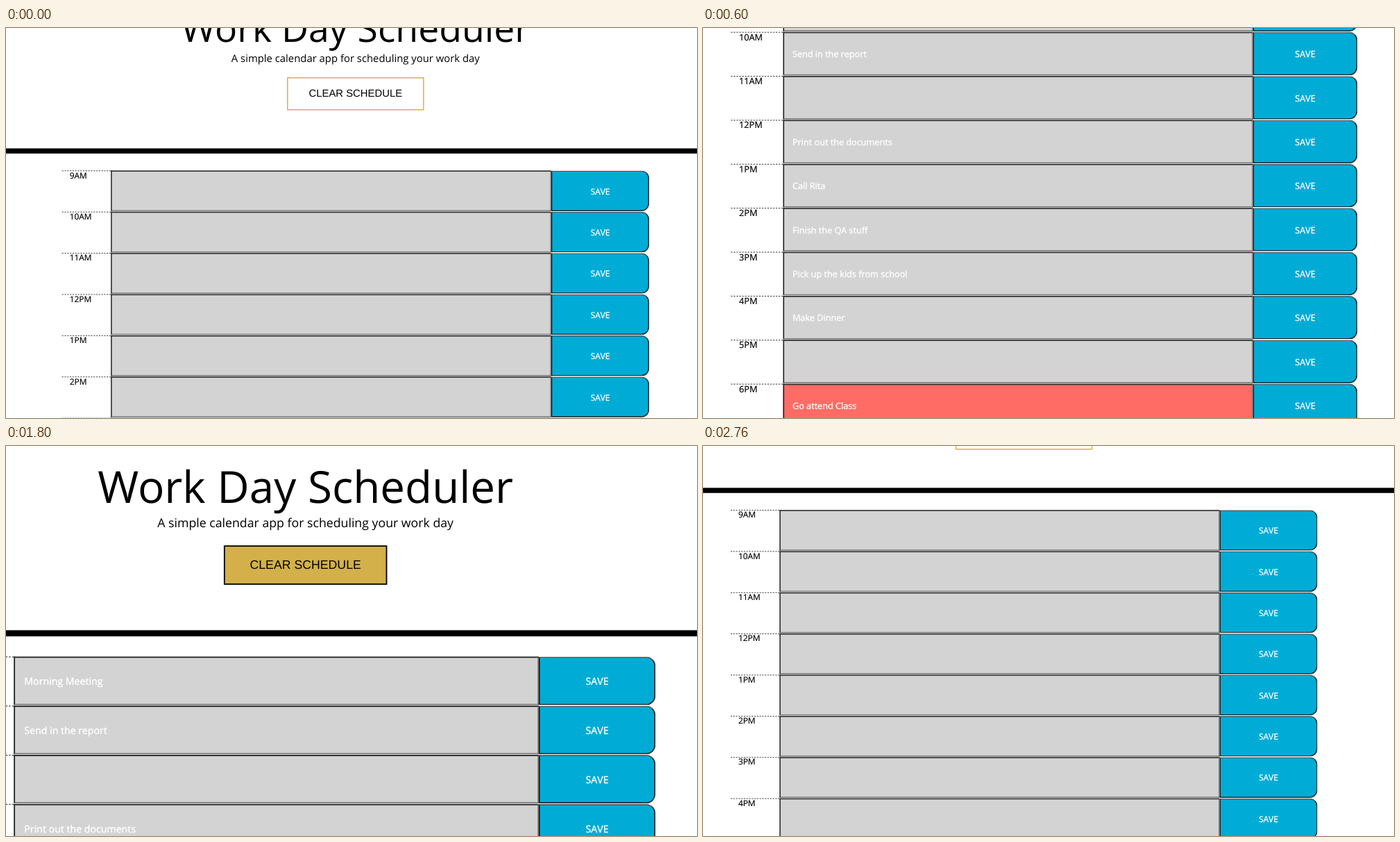
Recreate the animation shown at these times as an HTML page. Size 996 by 562 pixels, loop 3 s.

```html
<!DOCTYPE html>
<html lang="en">
<head>
<meta charset="utf-8">
<title>Work Day Scheduler</title>
<style>
  html, body {
    margin: 0;
    width: 100%;
    height: 100%;
    overflow: hidden;
    background: #fff;
  }
  .stage {
    position: relative;
    width: 100%;
    height: 100%;
    overflow: clip;
    contain: strict;
  }

  /* Camera: origin is the top left corner of the first row. */
  .page {
    position: absolute;
    left: 0;
    top: 0;
    width: 1140px;
    transform-origin: 0 0;
    transform: translate(var(--x), var(--y)) scale(var(--s));
    font: 16px/24px "Open Sans", sans-serif;
    text-rendering: geometricPrecision;
    white-space: nowrap;
    color: #000;
    animation: camera 3s step-end infinite;
  }
  @keyframes camera {
    0%, 100% { --x: 80.6px; --y: 205.4px; --s: .7425; }
    20% { --x: 40.2px; --y: -57.6px; --s: .7922; }
    40% { --x: 64.2px; --y: -46.8px; --s: .7645; }
    60% { --x: -72.8px; --y: 303.5px; --s: .885; }
    80% { --x: 39.8px; --y: 92.2px; --s: .742; }
  }

  h1, .lead, .clear, .bar { position: absolute; margin: 0; box-sizing: border-box; }
  h1, .lead { left: 0; width: 100%; text-align: center; font-weight: 400; }
  h1 { top: -320px; font-size: 72px; line-height: 86px; }
  .lead { top: -233.5px; font-size: 20px; line-height: 30px; }
  .clear {
    left: 437px;
    top: -181px;
    width: 266px;
    height: 64px;
    border: 2px solid #d4b04a;
    font: 20px/60px "Liberation Sans", Arial, sans-serif;
    text-align: center;
    animation: clear-hover 3s step-end infinite;
  }
  @keyframes clear-hover {
    60% { background: #d4b04a; border-color: #000; }
    80% { background: #fff; border-color: #d4b04a; }
  }
  .bar { left: -300px; top: -43px; width: 1800px; height: 10px; background: #000; }

  .row {
    display: flex;
    height: 79px;
    margin-bottom: 1px;
    -webkit-text-stroke: .25px;
  }
  .row > * { box-sizing: border-box; }
  .hour {
    width: 95px;
    padding-left: 15px;
    border-top: 1px dashed #000;
    line-height: 17px;
  }
  .task, .save {
    border: 2px solid;
    color: #fff;
    line-height: 77px;
    -webkit-text-stroke-width: .4px;
  }
  .task {
    width: 855px;
    padding-left: 15px;
    border-color: #222 #767676 #767676 #222;
    background: #d3d3d3;
  }
  .now .task { background: #ff6c65; }
  .task span { opacity: 0; animation: filled 3s step-end infinite; }
  @keyframes filled {
    20% { opacity: 1; }
    80% { opacity: 0; }
  }
  .save {
    width: 190px;
    border-color: #545454 #222 #222 #111;
    border-radius: 0 15px 15px 0;
    background: #00acd5;
    text-align: center;
    font-kerning: none;
  }
  .now .save { animation: save-hover 3s step-end infinite; }
  @keyframes save-hover {
    40% { background: #7bb8c9; }
    60% { background: #00acd5; }
  }
</style>
</head>
<body>
<div class="stage">
  <div class="page">
    <h1>Work Day Scheduler</h1>
    <p class="lead">A simple calendar app for scheduling your work day</p>
    <div class="clear">CLEAR SCHEDULE</div>
    <div class="bar"></div>
  </div>
</div>
<script>
  const tasks = [
    "Morning Meeting", "Send in the report", "", "Print out the documents", "Call Rita",
    "Finish the QA stuff", "Pick up the kids from school", "Make Dinner", "", "Go attend Class"
  ];
  const label = h => (h % 12 || 12) + (h < 12 ? "AM" : "PM");

  const rows = tasks.map((task, i) => `
    <div class="row${i === 9 ? " now" : ""}">
      <div class="hour">${label(9 + i)}</div>
      <div class="task"><span>${task}</span></div>
      <div class="save">SAVE</div>
    </div>`);
  document.querySelector(".page").insertAdjacentHTML("beforeend", rows.join(""));
</script>
</body>
</html>
```
